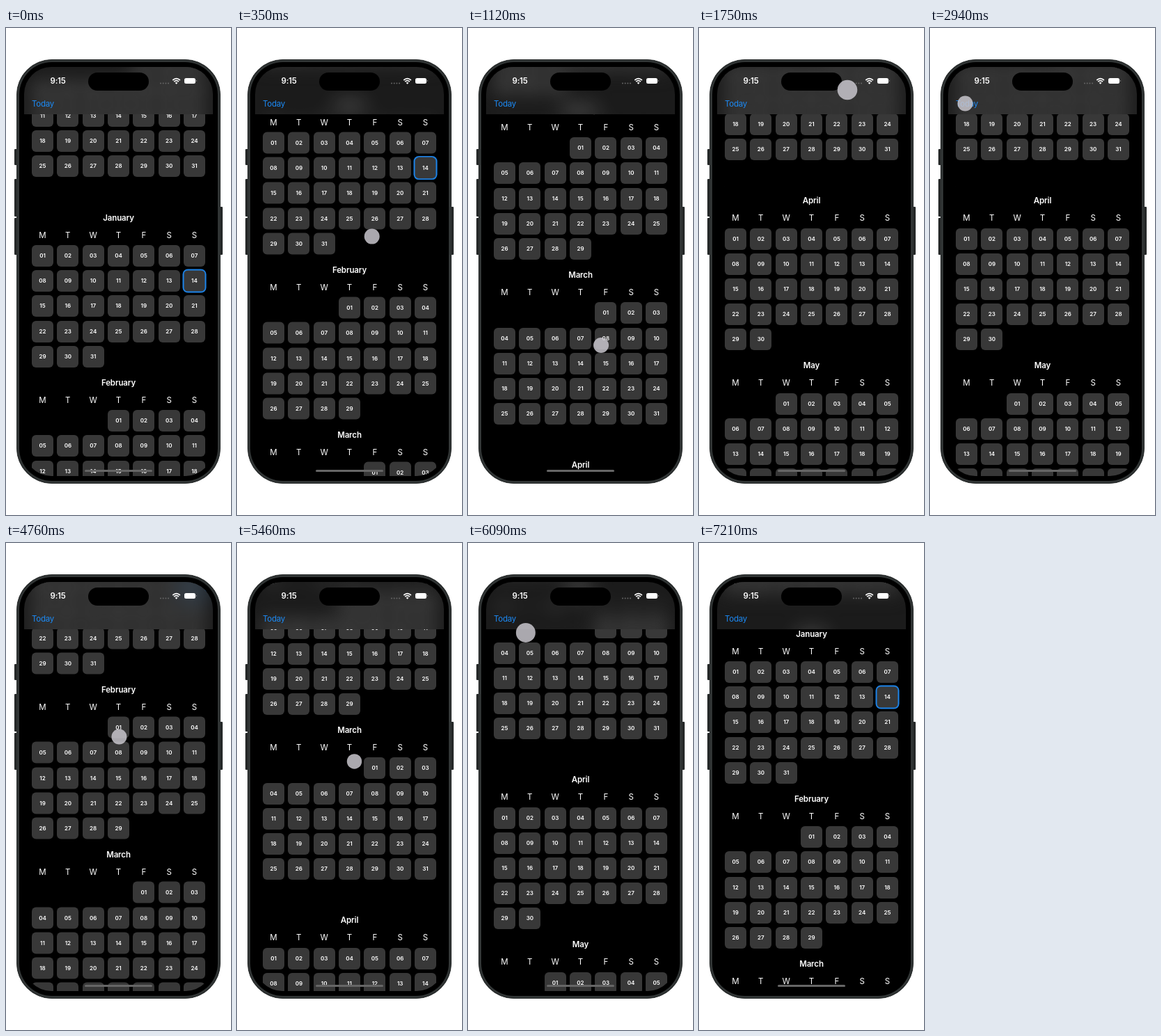
These frames come from a looping animation (323 by 700 pixels, 8940 ms). An HTML page:

```html
<!DOCTYPE html>
<html lang="en">
<head>
<meta charset="utf-8">
<title>Calendar</title>
<style>
html, body { margin: 0; width: 100%; height: 100%; overflow: hidden; background: #fff; }
body { position: relative; font: 11.5px/16px Inter, Roboto, sans-serif; color: #fff; }
div { position: absolute; box-sizing: border-box; white-space: nowrap; }
.button { width: 4px; background: #252828; border-radius: 1px; }
#phone { left: 15px; top: 45px; width: 293px; height: 610px; border-radius: 51px; background: #000;
  border: 1px solid #2c3030; box-shadow: inset 0 0 0 3px #313535; }
#screen { left: 26px; top: 56px; width: 271px; height: 588px; border-radius: 39px; overflow: hidden; background: #000; }
.view { left: -26px; top: -56px; width: 323px; height: 700px; }
.list { left: 0; top: 0; }
.label { width: 100px; height: 16px; text-align: center; }
.title { font-weight: 600; letter-spacing: -.01em; }
.cell { width: 31px; height: 31px; border-radius: 6px; background: #383838;
  font-size: 8px; font-weight: 600; line-height: 31px; text-align: center; }
.today { box-shadow: 0 0 0 1.5px #1c84ea, inset 0 0 0 .5px #1c84ea; }
#header { left: 26px; top: 56px; width: 271px; height: 68px; overflow: hidden; background: #1b1b1b; }
#haze { filter: blur(14px); }
#link { left: 37px; top: 100.5px; color: #1c8af5; letter-spacing: -.02em; }
#clock { left: 63.5px; top: 68px; font-weight: 600; letter-spacing: -.02em; }
#island { left: 118px; top: 64px; width: 87px; height: 25.5px; border-radius: 13px; background: #000; }
#home { left: 113px; top: 634.5px; width: 97px; height: 3px; border-radius: 2px; background: #666; }
svg { position: absolute; left: 0; top: 0; }
#touch { left: 0; top: 0; width: 28px; height: 28px; border-radius: 50%; background: rgba(200,198,204,.85); }
</style>
</head>
<body>
<div class="button" style="left:12px;top:174px;height:23px"></div>
<div class="button" style="left:12px;top:217px;height:54px"></div>
<div class="button" style="left:12px;top:273px;height:53px"></div>
<div class="button" style="left:307px;top:257px;height:69px"></div>
<div id="phone"></div>
<div id="screen"><div class="view">
  <div class="list"></div>
  <div id="header"><div class="view" id="haze"></div></div>
  <div id="link">Today</div>
  <div id="clock">9:15</div>
  <div id="island"></div>
  <svg width="323" height="130" fill="#fff">
    <path d="M222 79.5H235" stroke="#666" stroke-width="2" stroke-linecap="round" stroke-dasharray="0 3.7"/>
    <g fill="none" stroke="#fff" stroke-width="1.7">
      <path d="M239.3 75Q244.6 70.4 249.9 75"/>
      <path d="M241.2 77.2Q244.6 74.2 248 77.2"/>
    </g>
    <path d="M242.7 78.7Q244.6 77.2 246.5 78.7L244.6 80.7Z"/>
    <rect x="256" y="72" width="16" height="8" rx="2.5"/>
    <path d="M272.8 74.6Q275 76 272.8 77.4Z" fill="#999"/>
  </svg>
  <div id="home"></div>
  <div id="touch"></div>
</div></div>
<script>
const LOOP = 8940, STEP = 70, ROW = 36.1, COL = 36.33, MONTH = 237.1;
const list = document.querySelector('.list');
const touch = document.getElementById('touch');

function add(cls, x, y, w, h, text) {
  const el = document.createElement('div');
  el.className = cls;
  el.style.left = x - w / 2 + 'px';
  el.style.top = y - h / 2 + 'px';
  el.textContent = text;
  list.append(el);
}
const colX = c => 52.5 + COL * c;

// A month ending on Sunday keeps an empty extra row.
let titleY = -0.3;
for (let m = 0; m < 9; m++) {
  const first = new Date(2023, 11 + m, 1);
  const days = new Date(2023, 12 + m, 0).getDate();
  const shift = (first.getDay() + 6) % 7;
  add('label title', 161.5, titleY, 100, 16, first.toLocaleString('en-US', { month: 'long' }));
  [...'MTWTFSS'].forEach((d, c) => add('label', colX(c), titleY + 25, 100, 16, d));
  for (let d = 1; d <= days; d++) {
    const i = shift + d - 1;
    add(m === 1 && d === 14 ? 'cell today' : 'cell', colX(i % 7),
      titleY + 54.8 + ROW * Math.floor(i / 7), 31, 31, String(d).padStart(2, '0'));
  }
  titleY += MONTH + ((shift + days) % 7 ? 0 : ROW);
}

// The header shows a blurred copy of the list.
const copy = list.cloneNode(true);
copy.setAttribute('aria-hidden', 'true');
document.getElementById('haze').append(copy);

const ease = {
  io: u => u * u * (3 - 2 * u),
  in: u => u ** 1.5,
  out: u => 1 - (1 - u) ** 3
};

// Keys: time, easing towards this key, values
const scroll = [
  [0, 'io', 0], [140, 'io', 0], [420, 'in', 250], [1050, 'out', 392], [1120, 'io', 392],
  [1540, 'io', 759], [1680, 'out', 772], [3220, 'io', 772], [3710, 'io', 142],
  [4480, 'io', 142], [4830, 'in', 362], [5250, 'out', 392], [5810, 'io', 664],
  [5950, 'out', 680], [6720, 'io', 680], [7210, 'io', 142]
];
const pointer = [
  [70, 'io', 180, 466, 13.5], [140, 'io', 182, 462, 11], [420, 'in', 200, 212, 11],
  [490, 'out', 201, 204, 14], [1050, 'io', 191, 456, 14], [1120, 'io', 191, 456, 11],
  [1540, 'io', 211, 89, 11], [1680, 'out', 213, 89, 14.3], [1750, 'io', 213, 89, 14.3],
  [1820, 'io', 215, 86, 14], [2240, 'io', 56, 103, 14], [2380, 'io', 56, 103, 14],
  [2590, 'io', 72, 87, 14], [2800, 'io', 50.5, 108.5, 14], [2870, 'io', 50.5, 108.5, 11],
  [3010, 'io', 50.5, 108.5, 11], [3150, 'io', 49, 113, 14], [3640, 'io', 49, 113, 14],
  [4340, 'io', 157, 432, 13.5], [4410, 'io', 156, 436, 13.5], [4480, 'io', 156, 436, 11],
  [4830, 'in', 165, 216, 11], [4900, 'out', 166, 210, 14], [5180, 'io', 165, 400, 14],
  [5250, 'io', 165, 400, 10.7], [5810, 'io', 176, 128, 10.7], [5950, 'io', 94, 137, 14],
  [6370, 'io', 51, 106, 14], [6510, 'io', 51, 106, 11], [6650, 'io', 51, 106, 13]
];

function at(keys, t) {
  const n = keys.findIndex(k => k[0] > t);
  if (n < 0) return keys[keys.length - 1].slice(2);
  if (!n) return keys[0].slice(2);
  const a = keys[n - 1], b = keys[n];
  const u = ease[b[1]]((t - a[0]) / (b[0] - a[0]));
  return a.slice(2).map((v, i) => v + (b[i + 2] - v) * u);
}

function draw() {
  const t = Math.floor(performance.now() % LOOP / STEP) * STEP;
  const shift = `translateY(${-at(scroll, t)[0]}px)`;
  list.style.transform = copy.style.transform = shift;
  const [x, y, r] = at(pointer, t);
  touch.style.visibility = t >= 70 && t < 6650 ? 'visible' : 'hidden';
  touch.style.transform = `translate(${x - 14}px, ${y - 14}px) scale(${r / 14})`;
  requestAnimationFrame(draw);
}
draw();
</script>
</body>
</html>
```
